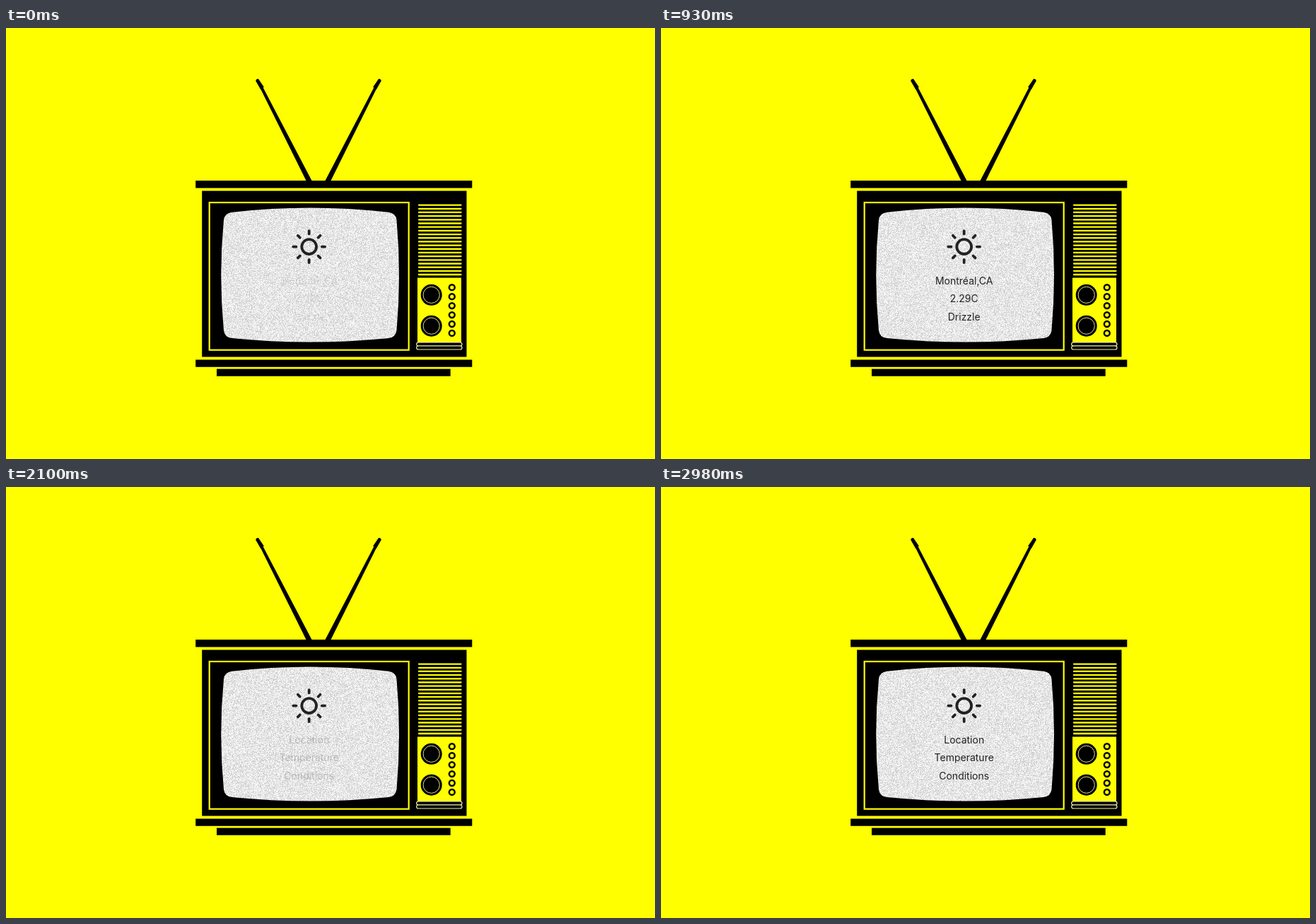
These frames come from a looping animation (918x610 px, 3.08 s). An HTML page with a canvas:

```html
<!DOCTYPE html>
<html lang="en">
<head>
<meta charset="utf-8">
<title>Weather TV</title>
<style>
  html, body { margin: 0; width: 100%; height: 100%; overflow: hidden; background: #ff0; }
  canvas, svg { position: absolute; display: block; }
  canvas { left: 302px; top: 252px; }
  svg { left: 0; top: 0; }
  #set { filter: blur(.4px); }
  text { font: 400 14px Inter, Roboto, sans-serif; text-anchor: middle; fill: #222; }
</style>
</head>
<body>
<canvas id="snow" width="256" height="195"></canvas>
<svg width="918" height="610" viewBox="0 0 918 610">
  <defs>
    <g id="antenna">
      <path d="M360 86 363.5 84 433 217H425Z"/>
      <path d="M353.3 75Q353.3 71.8 357 72L364.8 83.5 360.3 87.3Z"/>
    </g>
  </defs>
  <g id="set">
    <use href="#antenna"/>
    <use href="#antenna" transform="matrix(-1 0 0 1 884 0)"/>
    <path d="M268.2 216H659.3V226.5H268.2ZM268.2 469.5H659.3V479.8H268.2ZM298 482.5H628.7V492.8H298Z"/>
    <path fill-rule="evenodd" d="M277.2 230.5H651.5V465.4H277.2Z
      M320 260.8Q430 248.2 541 260.8Q551.5 262 552.5 272Q559.5 349.5 552.5 428Q551 438 541 439
      Q430 450 320 439Q309 438 308 428Q300.5 349.5 308 272Q309 262 320 260.8Z"/>
    <rect x="287.7" y="247" width="282" height="208.7" fill="none" stroke="#ff0" stroke-width="2.2"/>
    <path id="grille" stroke="#ff0" stroke-width="2.3" stroke-linecap="round"/>
    <path fill="#ff0" d="M582 353.5H644V446H582Z"/>
    <g id="controls"></g>
    <g stroke="#f4f4a8" stroke-width="1.2">
      <rect x="580.7" y="445" width="64.3" height="5" rx="2.5"/>
      <rect x="580.7" y="450" width="64.3" height="5" rx="2.5"/>
    </g>
  </g>
  <g transform="translate(428.7 309.6)" fill="none" stroke="#222" stroke-width="3.8" stroke-linecap="round">
    <circle r="10.4"/>
    <path id="rays"/>
  </g>
  <g id="report"></g>
  <g id="labels"></g>
</svg>
<script>
const LOOP = 3080;
const STEPS = [0, 150, 330, 480, 630, 780, 930, 1080, 1220, 1370, 1510,
  1660, 1810, 1960, 2100, 2250, 2400, 2540, 2690, 2830, 2980];
const $ = id => document.getElementById(id);
const range = (n, f) => Array.from({ length: n }, (_, i) => f(i)).join('');
const circle = (x, y, r, style = '') => `<circle cx="${x}" cy="${y}" r="${r}" ${style}/>`;
const lines = words => words.map((w, i) =>
  `<text x="428.7" y="${363 + i * 25.4}">${w}</text>`).join('');

$('grille').setAttribute('d', range(20, i => `M584 ${250.6 + i * 5.18}H643.5`));
$('rays').setAttribute('d', range(8, i => {
  const c = Math.cos(i * Math.PI / 4), s = Math.sin(i * Math.PI / 4);
  return `M${18.2 * c} ${18.2 * s}L${22.4 * c} ${22.4 * s}`;
}));
$('controls').innerHTML =
  [377.8, 421.7].map(y => circle(601.7, y, 15) +
    circle(601.7, y, 11.6, 'fill="none" stroke="#dddd90"')).join('') +
  range(6, i => circle(630.8, 367.2 + i * 12.95, 3.9, 'fill="#ff0" stroke="#000" stroke-width="2.5"'));
$('report').innerHTML = lines(['Montréal,CA', '2.29C', 'Drizzle']);
$('labels').innerHTML = lines(['Location', 'Temperature', 'Conditions']);

const ctx = $('snow').getContext('2d');
const img = ctx.createImageData(256, 195);
const pixels = new Uint32Array(img.data.buffer);

function drawSnow(seed) {
  let s = (seed + 1) * 2654435761 >>> 0;
  const rand = () => {
    s ^= s << 13; s ^= s >>> 17; s ^= s << 5;
    return (s >>> 0) / 4294967296;
  };
  for (let i = 0; i < pixels.length; i++) {
    const v = (rand() < .6 ? 236 : 203) + rand() * 14 | 0;
    pixels[i] = 0xff000000 | v * 0x10101;
  }
  ctx.putImageData(img, 0, 0);
}

function swing(t, start, length) {
  const p = Math.min(1, Math.max(0, (t - start) / length));
  return .5 - Math.cos(p * Math.PI) / 2;
}

let shown = -1;
function render(ms) {
  const now = ms % LOOP;
  const step = STEPS.findLastIndex(t => t <= now);
  if (step === shown) return;
  shown = step;
  const t = STEPS[step];
  drawSnow(step);
  $('report').setAttribute('opacity', swing(t, -180, 1000) * (1 - swing(t, 880, 900)));
  $('labels').setAttribute('opacity', swing(t, 1820, 900));
}

const begin = performance.now();
function tick() {
  render(performance.now() - begin);
  requestAnimationFrame(tick);
}
tick();
</script>
</body>
</html>
```
